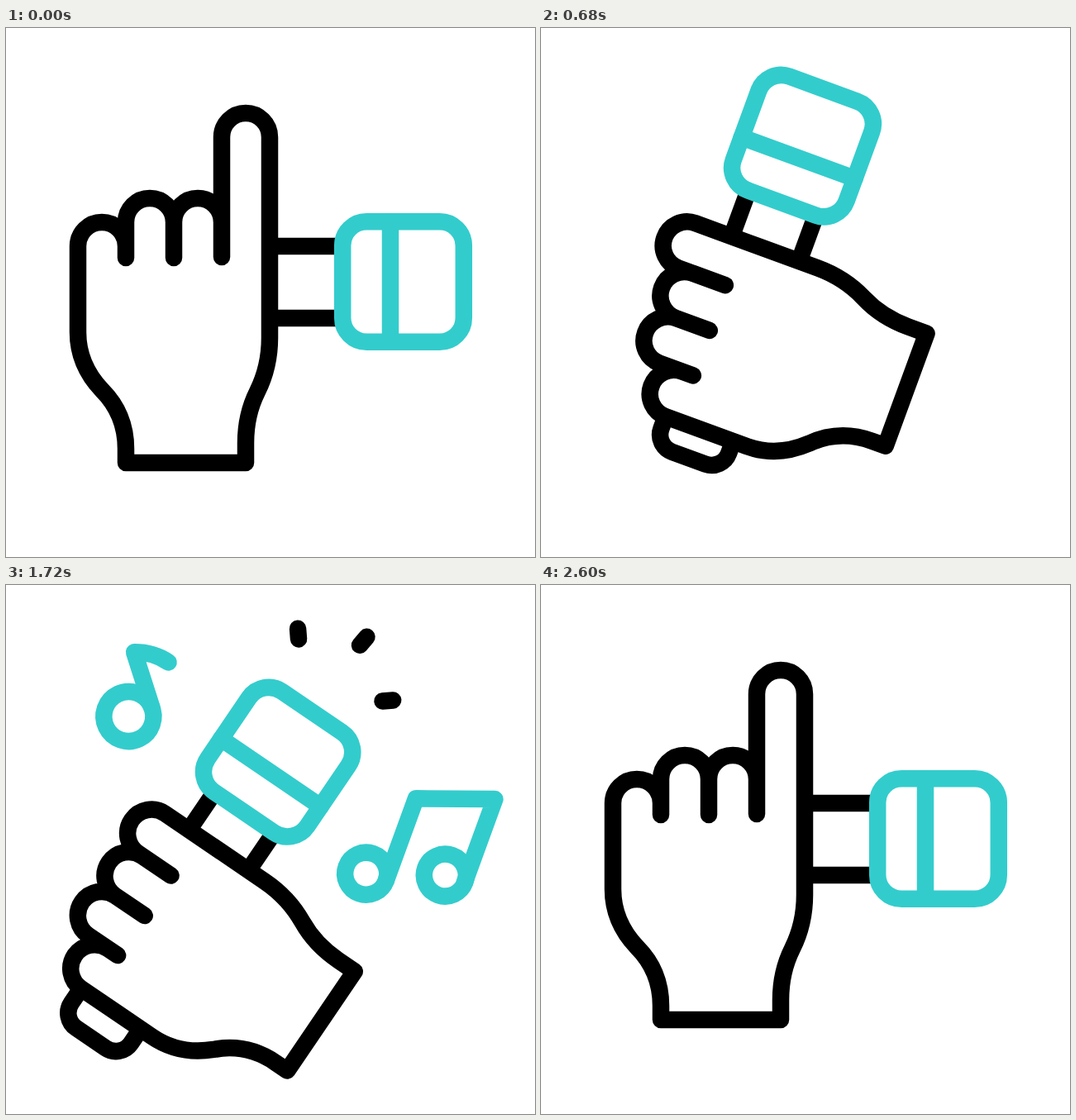
Write an HTML page that moves like this. It is 640 px wide and 640 px high and loops after 2.8 s.

```html
<!DOCTYPE html>
<html lang="en">
<head>
<meta charset="utf-8">
<title>Hand and microphone</title>
<style>
  html, body { margin: 0; height: 100%; overflow: hidden; background: #fff; }
  svg { display: block; width: 100%; height: 100%; }
  #sparks { vector-effect: non-scaling-stroke; }
</style>
</head>
<body>
<svg viewBox="0 0 640 640" fill="none" stroke="#000" stroke-width="20.5" stroke-linecap="round" stroke-linejoin="round">
  <g stroke="#3cc">
    <g id="single">
      <circle r="30"/>
      <path d="M30 3L40 -67Q61 -57 72 -38"/>
    </g>
    <g id="pair">
      <circle cx="-57.5" cy="68" r="25.5"/>
      <circle cx="33" cy="37" r="25.5"/>
      <path d="M-32 68V-38L58 -70V37"/>
    </g>
  </g>
  <g id="arm">
    <path id="shaft" fill="#fff"/>
    <g id="mic">
      <path id="sparks" d="M137 -63l10 -8M172.5 2.3l13 1.4M132 63l8 10"/>
      <g stroke="#3cc">
        <rect x="-73.3" y="-72.8" width="146.6" height="145.6" rx="29" fill="#fff"/>
        <path d="M-15.5 -72.8V72.8"/>
      </g>
    </g>
    <path id="hand" fill="#fff"/>
  </g>
</svg>
<script>
const LOOP = 2800;
const part = id => document.getElementById(id);
const set = (id, name, value) => part(id).setAttribute(name, value);

// Symmetric ease in and out between two times, from 0 to 1
function ease(t, from, to, power = 2.65) {
  const x = Math.min(1, Math.max(0, (t - from) / (to - from)));
  return x < .5 ? (2 * x) ** power / 2 : 1 - (2 - 2 * x) ** power / 2;
}

const handPath = tip => `M87 264A29 29 0 0 1 145 264V278V235A29 29 0 0 1 203 235V278V235
  A29 29 0 0 1 261 235V277V${tip}A29 29 0 0 1 319 ${tip}V375
  C319 398 314 420 304 440C294 460 290 480 290 502V526H145V509
  C145 481 135 457 116 438C98 419 87 395 87 368Z`;

const shaftPath = (end, top) => `M${top} 264H${end + 22}A22 22 0 0 0 ${end} 286V329
  A22 22 0 0 0 ${end + 22} 351H${top}`;

function placeNote(id, [x0, y0], [x1, y1], out, turn) {
  set(id, 'visibility', out > 0 ? 'visible' : 'hidden');
  set(id, 'transform', `translate(${x0 + (x1 - x0) * out} ${y0 + (y1 - y0) * out}) rotate(${turn})`);
}

function draw(t) {
  // The arm turns about the middle of the wrist
  const grip = ease(t, 200, 880) - ease(t, 1920, 2600);
  const sway = ease(t, 850, 1470, 2.2);
  const x = 217.5 + grip * (255 - 91.5 * sway);
  const y = 526 + grip * (102 * sway - 100.5);
  set('arm', 'transform', `translate(${x} ${y}) rotate(${-grip * (79.5 - 23.7 * sway)}) translate(-217.5 -526)`);
  set('hand', 'd', handPath(132 + 97 * grip));
  const slide = 33 * grip;
  set('shaft', 'd', shaftPath(90 - 46 * grip, 420 - slide));
  set('mic', 'transform', `translate(${480.5 - slide} 307)`);

  const burst = .86 * ease(t, 1000, 1240) + .14 * ease(t, 1240, 1720) - ease(t, 2080, 2360);
  set('sparks', 'transform', `scale(${Math.max(0, burst)})`);

  const back = ease(t, 2100, 2440, 2);
  const tilt = ease(t, 900, 1560, 2);
  const settle = ease(t, 1560, 2120, 2);
  placeNote('single', [270, 262], [150 - 10 * settle, 160 - 6 * settle],
    ease(t, 760, 1160, 2) - back, -27 - 4 * tilt + 31 * settle - 27 * back);
  placeNote('pair', [235, 341], [513, 305],
    ease(t, 760, 1330, 2) - back, 7 + 17 * tilt - 24 * settle);
}

function tick() {
  draw(performance.now() % LOOP);
  requestAnimationFrame(tick);
}
tick();
</script>
</body>
</html>
```
